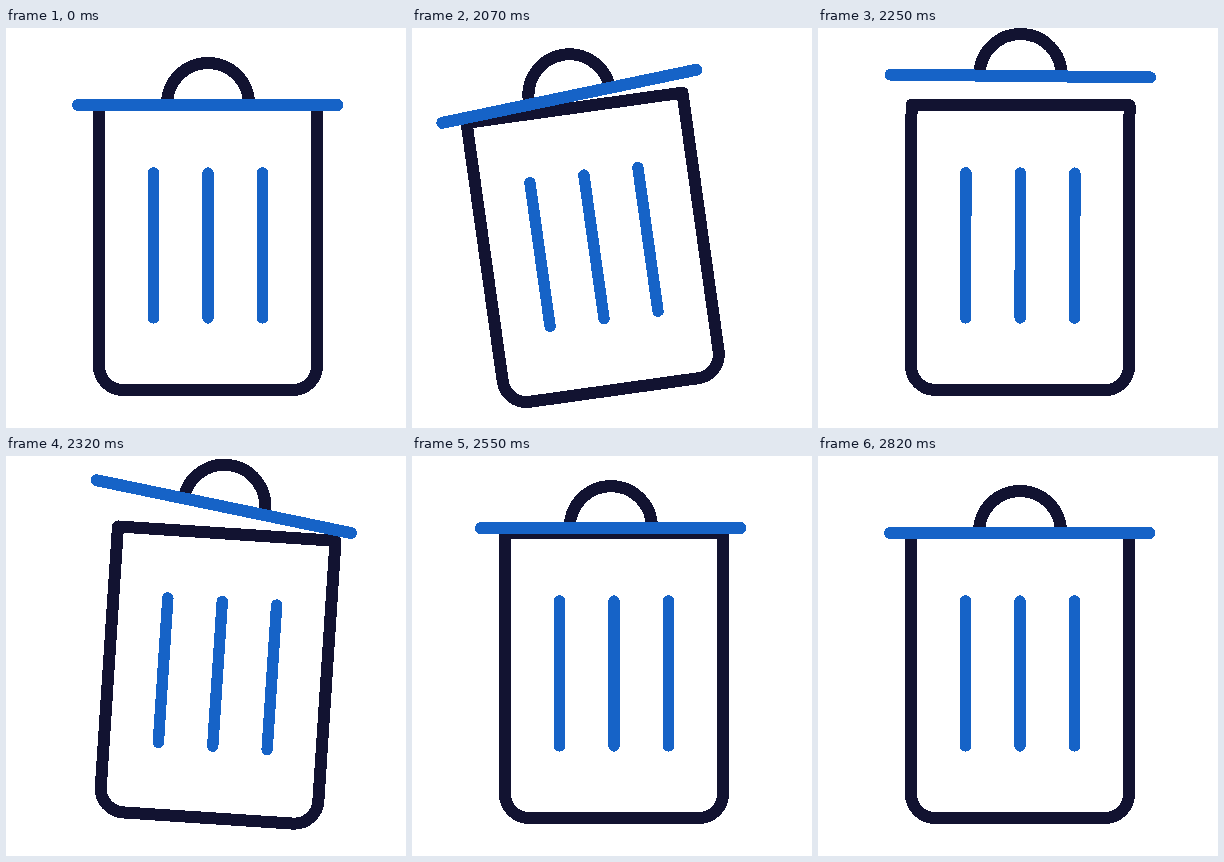
An HTML page that plays this animation: 400x400 px, repeating every 2.85 s.

```html
<!DOCTYPE html>
<html lang="en">
<head>
<meta charset="utf-8">
<title>Trash can</title>
<style>
  html, body { margin: 0; width: 100%; height: 100%; overflow: hidden; background: #fff; }
  svg { display: block; width: 100%; height: 100%; shape-rendering: crispEdges; }
  path { fill: none; stroke: #121331; stroke-width: 12; stroke-linecap: round; stroke-linejoin: round; }
  .accent { stroke: #1663c7; }
  .slots { stroke-width: 11.4; }
</style>
</head>
<body>
<svg viewBox="0 0 400 400">
  <g id="can">
    <path d="M93 77H311V338a24 24 0 0 1-24 24H117a24 24 0 0 1-24-24Z"/>
    <path class="accent slots" d="M147.5 145V290M202 145V290M256.5 145V290"/>
    <g id="lid">
      <path d="M161 76a41 41 0 0 1 82 0"/>
      <path class="accent" d="M72 77H331.5"/>
    </g>
  </g>
</svg>
<script>
const LOOP = 2850, BEGIN = 2000;
const can = document.getElementById('can');
const lid = document.getElementById('lid');

const linear = u => u;
const easeOut = u => 1 - (1 - u) ** 2.3;
const easeInOut = u => (1 - Math.cos(Math.PI * u)) / 2;

// Chains moves [ms after the start, value, easing], beginning and resting at zero.
const motion = (...moves) => t => {
  let from = 0, value = 0;
  for (const [to, goal, ease] of moves) {
    if (t < to) return value + (goal - value) * ease(Math.max(0, t - from) / (to - from));
    from = to;
    value = goal;
  }
  return value;
};

const swing = motion([150, -10, easeOut], [309, 4.5, easeInOut], [525, 0, easeOut]);
const lift = motion([180, -29, linear], [250, -29, linear], [660, 0, easeInOut]);
const tilt = motion([160, -8.5, easeInOut], [330, 8, easeInOut], [620, -1.3, easeInOut], [825, 0, easeInOut]);
const shift = motion([140, -6, linear], [250, 0, easeInOut], [400, -9, easeInOut], [650, 0, easeInOut]);

function draw(now) {
  // Motion advances in 25 ms steps, shown on a 10 ms clock.
  const clock = Math.floor(now % LOOP / 10) * 10;
  const t = Math.floor((clock + 5) / 25) * 25 - BEGIN;
  can.setAttribute('transform', `rotate(${swing(t)} 202 362)`);
  lid.setAttribute('transform', `translate(${shift(t)} ${lift(t)}) rotate(${tilt(t)} 202 77)`);
}

const start = performance.now();
(function loop() {
  draw(performance.now() - start);
  requestAnimationFrame(loop);
})();
</script>
</body>
</html>
```
